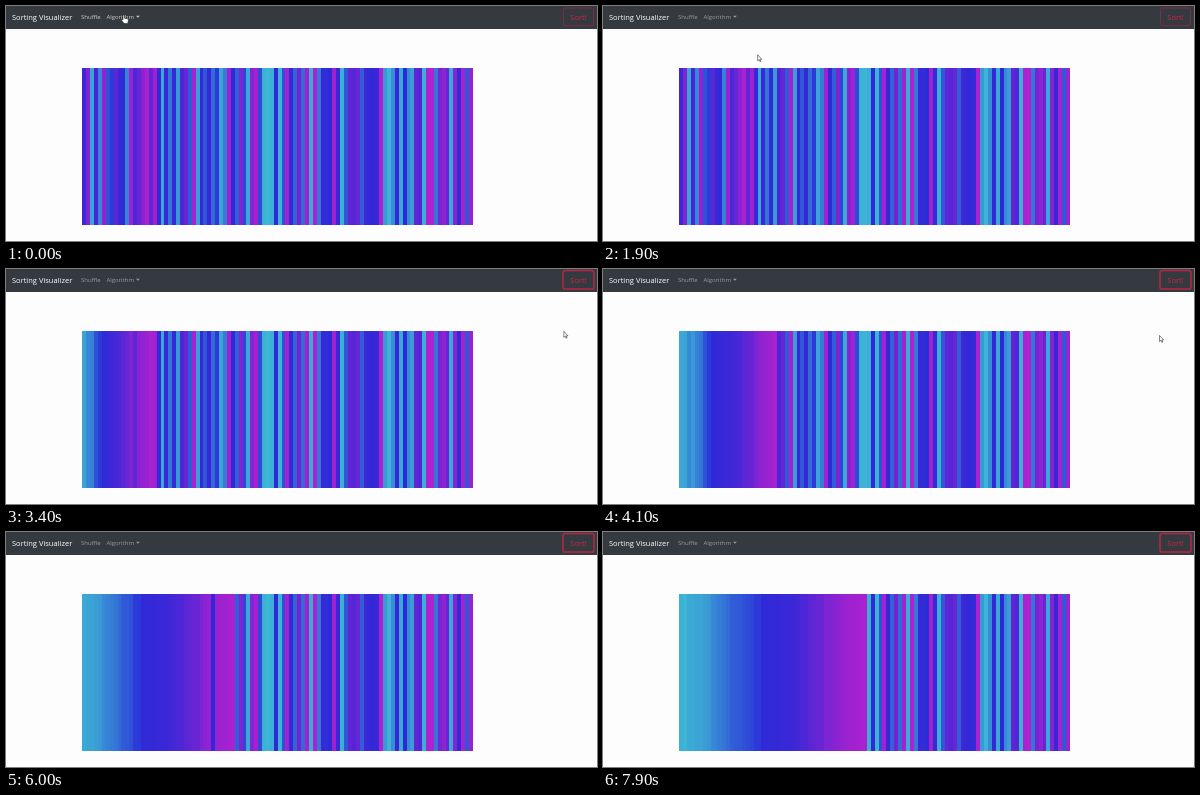
An HTML page that plays this animation: 591x235 px, repeating every 8 s.

```html
<!DOCTYPE html>
<html lang="en">
<head>
<meta charset="utf-8">
<title>Sorting Visualizer</title>
<style>
html, body { margin: 0; width: 100%; height: 100%; overflow: hidden; background: #fefdfe; }
svg { display: block; width: 591px; height: 235px; font: 6px "Open Sans", "Noto Sans", sans-serif; }
</style>
</head>
<body>
<svg id="stage" viewBox="0 0 591 235" xmlns="http://www.w3.org/2000/svg">
  <rect width="591" height="235" fill="#fefdfe"/>
  <g id="bars" shape-rendering="crispEdges"></g>
  <rect width="591" height="23" fill="#343a40"/>
  <text x="6" y="13.7" font-size="7.5" fill="#fff">Sorting Visualizer</text>
  <text id="shuffle" x="75" y="13.2" fill="#fff">Shuffle</text>
  <g id="algorithm" fill="#fff">
    <text x="100.4" y="13.2">Algorithm</text>
    <path d="M130 9.8h3.8l-1.9 2z"/>
  </g>
  <g id="menu">
    <rect x="97.8" y="18.6" width="61.8" height="93.8" rx="1.5" fill="#fff" stroke="#c9cacc" stroke-width=".6"/>
    <rect id="highlight" x="98.2" width="61" height="12.4" fill="#f5f5f7"/>
  </g>
  <rect id="ring" x="556.9" y="1.3" width="31.2" height="18.9" rx="2.2" fill="none" stroke="#dc2445" stroke-width="1.3" stroke-opacity=".75"/>
  <rect id="button" x="557.5" y="2" width="30" height="17.6" rx="1.8" fill="#c81f43" stroke="#c81f43" stroke-width=".5"/>
  <text id="sort" x="564.3" y="13.7" font-size="7.5">Sort!</text>
  <g id="cursor" stroke="#222" stroke-width=".55" stroke-linejoin="round" fill="#fff">
    <path id="hand" d="M0 .6Q.8-.5 1.5.6V3.2L4.8 4Q5.6 4.3 5.4 5.4L4.7 8.5H1.2L-1.5 5.2Q-1.5 4.2-.6 4.6L0 5Z"/>
    <path id="arrow" d="M0 0V6L1.4 4.8 2.3 6.9 3.2 6.5 2.3 4.5H4.1Z"/>
  </g>
</svg>
<script>
const LOOP = 8000, STEP = 100;
const SORT_START = 2690, SORT_RATE = 0.442;
const MENU_OPEN = 500, MENU_CLOSE = 1800;
const LEFT = 76.4, PITCH = 3.905, TOP = 62, HEIGHT = 156.5;
const NS = "http://www.w3.org/2000/svg";

// Bar values from 0 (cyan) through 50 (blue) to 100 (magenta).
const values = [
  58, 80, 10, 60, 20, 88, 38, 45, 68, 55, 52, 22, 90, 62, 72, 85, 96, 70, 92, 54,
  8, 56, 26, 53, 14, 63, 72, 35, 95, 12, 55, 36, 54, 30, 46, 10, 24, 92, 52, 34,
  80, 42, 8, 84, 94, 40, 5, 3, 6, 52, 4, 38, 94, 54, 32, 76, 30, 93, 7, 97,
  25, 56, 48, 52, 92, 55, 6, 36, 70, 66, 72, 34, 58, 54, 52, 56, 97, 14, 4, 18,
  54, 8, 50, 20, 12, 70, 64, 6, 97, 98, 26, 78, 86, 72, 8, 84, 54, 95, 36, 90
];

const cursorPath = [
  { t: 0, x: 117, y: 9 },
  { t: 600, x: 117, y: 9 },
  { t: 1100, x: 132.5, y: 36 },
  { t: 1500, x: 130, y: 51 },
  { t: 1800, x: 130, y: 51 },
  { t: 2500, x: 575, y: 10.5 },
  { t: 2900, x: 575, y: 10.5 },
  { t: 3500, x: 556.5, y: 66.5 },
  { t: 4900, x: 556.5, y: 66.5 }
];

const $ = id => document.getElementById(id);
const set = (id, name, value) => $(id).setAttribute(name, value);
const show = (id, visible) => set(id, "visibility", visible ? "visible" : "hidden");

function add(parent, tag, attrs) {
  const node = document.createElementNS(NS, tag);
  for (const name in attrs) node.setAttribute(name, attrs[name]);
  return parent.appendChild(node);
}

const bars = values.map((_, i) => add($("bars"), "rect", {
  x: LEFT + i * PITCH, y: TOP, width: PITCH, height: HEIGHT
}));

["BubbleSort", "Selection Sort", "Insertion Sort", "Heap Sort", "Merge Sort", "Quick Sort", "Radix Sort"]
  .forEach((label, i) => {
    add($("menu"), "text", { x: 107.4, y: 30.7 + i * 12.45, fill: "#212529" }).textContent = label;
  });

function color(value) {
  const p = value / 100;
  return `hsl(${189 + 102 * p} ${64 + 9 * p}% ${54 - 7 * p}%)`;
}

// Insertion sort: the cost of each pass grows with the sorted prefix.
function arrangement(t) {
  if (t < SORT_START) return values;
  const progress = Math.sqrt(SORT_RATE * (t - SORT_START));
  const count = Math.floor(progress);
  const key = values[count];
  const prefix = values.slice(0, count).sort((a, b) => a - b);
  const shifts = prefix.filter(v => v > key).length;
  prefix.splice(count - Math.round((progress - count) * shifts), 0, key);
  return prefix.concat(values.slice(count + 1));
}

function cursorAt(t) {
  const next = cursorPath.findIndex(p => p.t > t);
  if (next < 0) return cursorPath[cursorPath.length - 1];
  const a = cursorPath[next - 1], b = cursorPath[next];
  const u = (t - a.t) / (b.t - a.t), ease = u * u * (3 - 2 * u);
  return { x: a.x + (b.x - a.x) * ease, y: a.y + (b.y - a.y) * ease };
}

function render(t) {
  arrangement(t).forEach((v, i) => bars[i].setAttribute("fill", color(v)));

  const { x, y } = cursorAt(t);
  const open = t >= MENU_OPEN && t < MENU_CLOSE;
  const overMenu = open && y > 20;
  const overAlgorithm = y < 22 && x > 98 && x < 136;
  const overButton = t < 4900 && x > 557 && y < 19;
  const focused = t >= 2800;

  set("shuffle", "fill-opacity", t < 100 ? 0.75 : 0.5);
  set("algorithm", "fill-opacity", open ? 1 : overAlgorithm ? 0.75 : 0.5);
  show("menu", open);
  show("highlight", overMenu);
  set("highlight", "y", 22.4 + 12.45 * Math.max(0, Math.floor((y - 22.4) / 12.45)));

  set("button", "fill-opacity", overButton ? 1 : 0);
  set("sort", "fill", overButton ? "#fff" : "#d42345");
  show("ring", focused);

  const pointing = overMenu || overAlgorithm || overButton;
  show("cursor", t < 4900);
  set("cursor", "transform", `translate(${x} ${y})`);
  set("hand", "display", pointing ? "inline" : "none");
  set("arrow", "display", pointing ? "none" : "inline");
}

const start = performance.now();
function tick() {
  const t = (performance.now() - start) % LOOP;
  render(Math.floor(t / STEP) * STEP);
  requestAnimationFrame(tick);
}
render(0);
requestAnimationFrame(tick);
</script>
</body>
</html>
```
